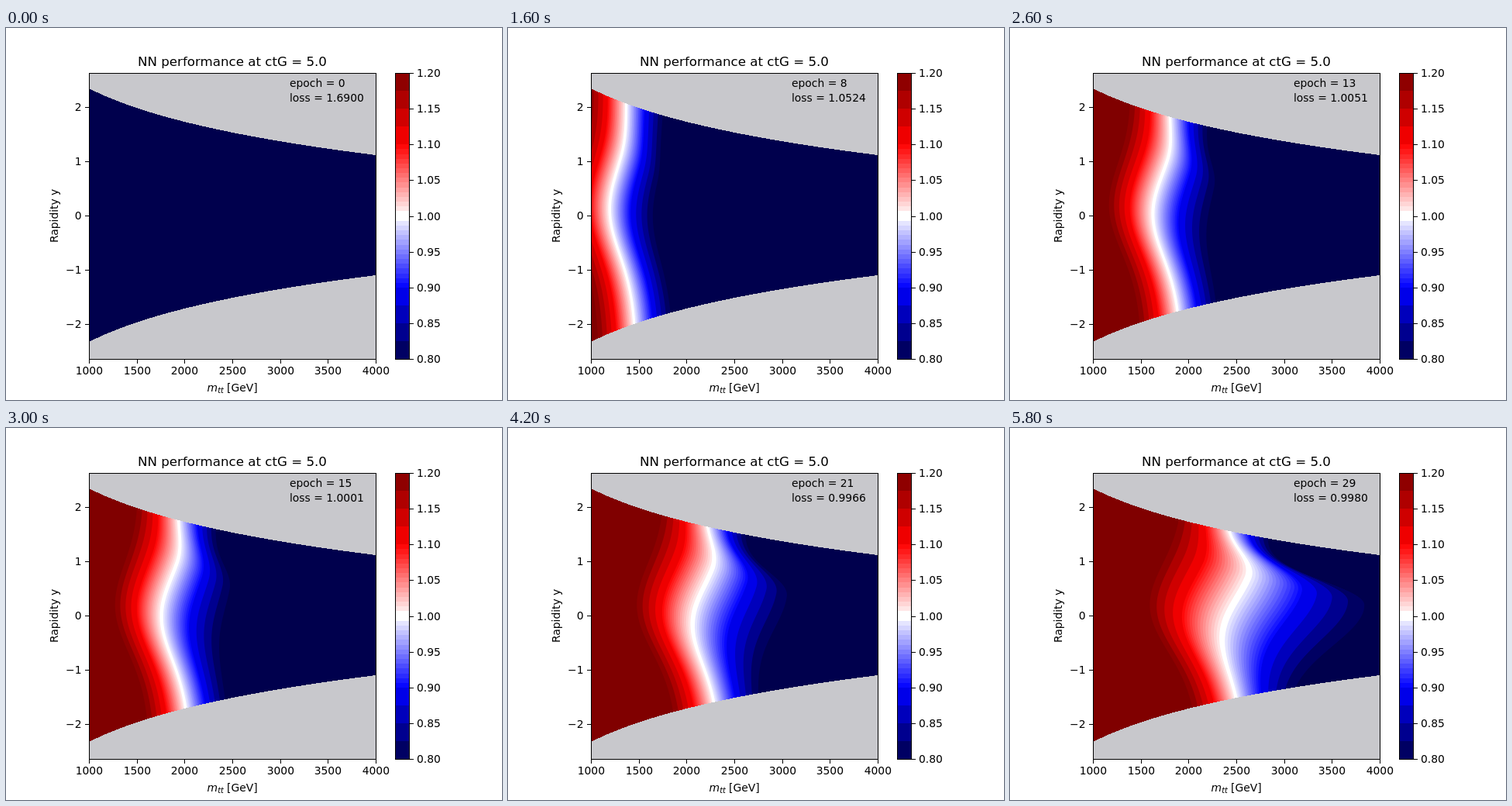
Write an HTML page with a canvas that moves like this. It is 640x480 px and loops after 6000 ms.

```html
<!DOCTYPE html>
<html>
<head>
<meta charset="utf-8">
<style>
html, body { margin: 0; width: 100%; height: 100%; overflow: hidden; background: #fff; }
canvas { display: block; }
</style>
</head>
<body>
<canvas id="stage" width="640" height="480"></canvas>
<script>
const ctx = document.getElementById('stage').getContext('2d');
const LEFT = 107, TOP = 58, SIZE = 370, RIGHT = LEFT + SIZE, BOTTOM = TOP + SIZE;
const EPOCHS = 30, STEP = 200;
const LOSSES = [[0, 1.69], [8, 1.0524], [13, 1.0051], [17, 0.9968], [21, 0.9966], [25, 0.9977], [29, 0.998]];

// Coarse bands at both ends, fine ones in the middle, one wide white band at 1
const levels = [];
for (let i = 0; i < 4; i++) levels.push(0.8 + i * 0.025);
for (let i = 0; i <= 30; i++) if (i !== 15) levels.push(0.9 + i / 150);
for (let i = 1; i < 5; i++) levels.push(1.1 + i * 0.025);

function seismic(t) {
  const stops = [[0, 0, 76.5], [0, 0, 255], [255, 255, 255], [255, 0, 0], [127.5, 0, 0]];
  const i = Math.min(3, Math.floor(t * 4)), f = t * 4 - i;
  return `rgb(${stops[i].map((c, k) => Math.round(c + (stops[i + 1][k] - c) * f))})`;
}
// Colour of the band just below level i
const bandColor = i => seismic(i ? ((levels[i] + levels[i - 1]) / 2 - 0.8) / 0.4 : 0);

const bell = (d, width) => Math.exp(-((d / width) ** 2));

// Contour x at rapidity u: a front that slows down, a notch in its middle,
// and a skewed ridge that grows towards the low values
function contourX(level, u, epoch) {
  const p = Math.max(0, (1.2 - level) * 10);
  const front = 262 - 147 * Math.exp((8 - epoch) / 11.3) + p * (22 + epoch / 4);
  const notch = (25 + 1.2 * epoch) * (0.85 * bell(u - 0.15, 1.15) + 0.07 * (u + 1.69));
  const d = u - (1.2 - 0.25 * p + 0.02 * (29 - epoch));
  const ridge = 0.19 * epoch ** 2 * (p / 4) ** 1.42 * bell(d, d > 0 ? 0.65 : 1.1);
  return front - notch + ridge;
}

function lossAt(epoch) {
  const i = Math.max(1, LOSSES.findIndex(p => p[0] >= epoch));
  const [e0, a] = LOSSES[i - 1], [e1, b] = LOSSES[i], floor = 0.99;
  return floor + (a - floor) * ((b - floor) / (a - floor)) ** ((epoch - e0) / (e1 - e0));
}

function rect(color, x, y, w, h) {
  ctx.fillStyle = color;
  ctx.fillRect(x, y, w, h);
}

function text(str, x, y, align = 'left', size = 13.89, style = '') {
  ctx.font = `${style} ${size}px "DejaVu Sans", sans-serif`;
  ctx.textAlign = align;
  ctx.fillStyle = '#000';
  ctx.fillText(str, x, y);
}

function drawField(epoch) {
  for (let y = TOP; y < BOTTOM; y++) {
    const u = (242 - y) / 70;
    rect(seismic(1), LEFT, y, SIZE, 1);
    for (let i = levels.length - 1; i >= 0; i--) {
      const x = Math.max(LEFT, contourX(levels[i], u, epoch));
      if (x < RIGHT) rect(bandColor(i), x, y, RIGHT - x, 1);
    }
  }
  // Kinematic limit
  for (let i = 0; i < SIZE; i++) {
    const half = 163.8 - 61.9 * Math.log(1 + 3 * i / SIZE);
    const h = Math.round(184 - half);
    rect('#c8c8cc', LEFT + i, TOP, 1, h);
    rect('#c8c8cc', LEFT + i, BOTTOM - 3 - h, 1, h + 3);
  }
}

function drawAxes() {
  text('NN performance at ctG = 5.0', 292, 49, 'center', 16.67);
  for (let i = 0; i <= 6; i++) {
    const x = Math.round(107.2 + i * 61.6);
    rect('#000', x, 428, 1, 5);
    text(1000 + i * 500, x + 0.3, 447, 'center');
  }
  for (let v = -2; v <= 2; v++) {
    const y = 242 - v * 70;
    rect('#000', 102, y, 5, 1);
    text(String(v).replace('-', '−'), 97.5, y + 5, 'right');
  }
  text('m', 259.6, 469, 'left', 13.89, 'italic');
  text('tt', 273.3, 471, 'left', 9.72, 'italic');
  text('[GeV]', 285, 469);
  ctx.save();
  ctx.translate(67, 242.4);
  ctx.rotate(-Math.PI / 2);
  text('Rapidity y', 0, 0, 'center');
  ctx.restore();
  ctx.strokeStyle = '#000';
  ctx.strokeRect(107.5, 58.5, 370, 369);
}

function drawColorbar() {
  const yOf = v => Math.round(427.4 - (v - 0.8) / 0.4 * 369.6);
  for (let i = 1; i < levels.length; i++) {
    const y = yOf(levels[i]);
    rect(bandColor(i), 502, y, 18, yOf(levels[i - 1]) - y);
  }
  for (let i = 0; i <= 8; i++) {
    const v = 0.8 + i * 0.05, y = yOf(v);
    rect('#000', 521, y, 5, 1);
    text(v.toFixed(2), 530, y + 5);
  }
  ctx.strokeRect(502.5, 58.5, 18, 369);
}

function draw(epoch) {
  rect('#fff', 0, 0, 640, 480);
  drawField(epoch);
  drawAxes();
  drawColorbar();
  text(`epoch = ${epoch}`, 366, 76);
  text(`loss = ${lossAt(epoch).toFixed(4)}`, 366, 95);
}

let shown = -1;
const start = performance.now();
function frame() {
  const epoch = Math.floor((performance.now() - start) / STEP) % EPOCHS;
  if (epoch !== shown) draw(shown = epoch);
  requestAnimationFrame(frame);
}
frame();
</script>
</body>
</html>
```
